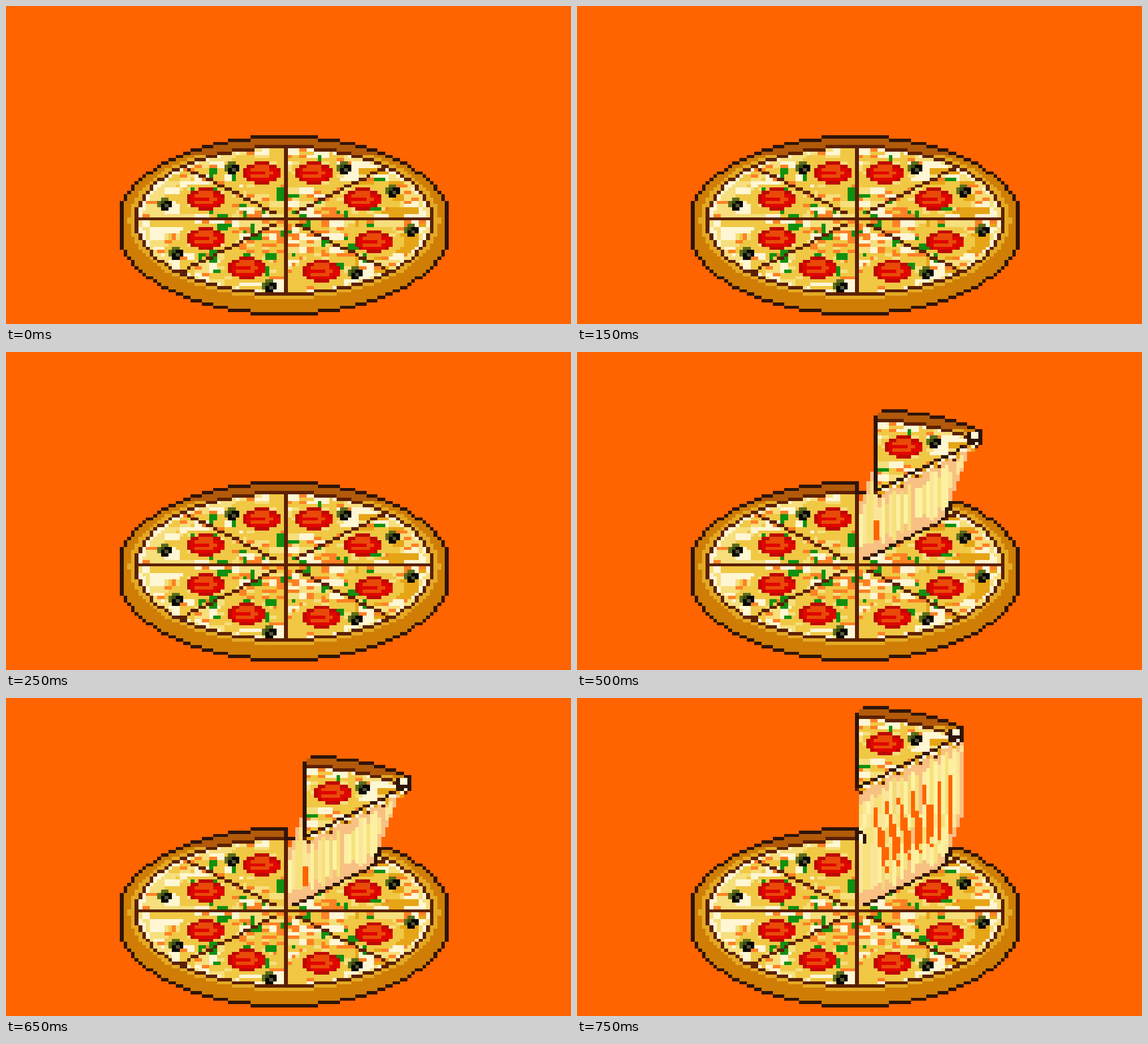
An HTML page with a canvas for the animation above (1000 ms loop, 998 by 561 pixels).

```html
<!DOCTYPE html>
<html lang="en">
<head>
<meta charset="utf-8">
<title>Pizza</title>
<style>
  html, body { margin: 0; width: 100%; height: 100%; overflow: hidden; background: #ff6400; }
  canvas { position: absolute; left: 0; top: 0; }
  .whole { animation: whole 1s step-end infinite; }
  .lift { animation: lift 1s step-end infinite; }
  .high { animation: high 1s step-end infinite; }
  @keyframes whole { 0% { opacity: 1 } 50%, 100% { opacity: 0 } }
  @keyframes lift { 0% { opacity: 0 } 50% { opacity: 1 } 75%, 100% { opacity: 0 } }
  @keyframes high { 0% { opacity: 0 } 75%, 100% { opacity: 1 } }
</style>
</head>
<body>
<canvas class="whole" width="998" height="561"></canvas>
<canvas class="lift" width="998" height="561"></canvas>
<canvas class="high" width="998" height="561"></canvas>
<script>
const COLS = 88, ROWS = 55, CELL_W = 6.6, CELL_H = 5.78, LEFT = 201, TOP = 228;
const MID_X = 44, MID_Y = 25, SLOPE = 0.58;
const DARK = '#2e1409', BROWN = '#5c2003', CREAM = '#fff6d4', YELLOW = '#f0c844',
      PALE = '#f6df7c', GOLD = '#e6a516', ORANGE = '#ff8124', GREEN = '#109010',
      CRUST = '#cf7d05', CRUST_LIGHT = '#e4aa24', CRUST_DARK = '#b25a0a', PEACH = '#f8c083',
      BACK = '#ff6400';

const pepperoni = [[33, 8], [47, 8], [18, 16], [60, 16], [18, 28], [63, 29], [29, 37], [49, 38]];
const olives = [[28, 8], [58, 8], [10, 19], [71, 15], [76, 27], [13, 34], [38, 44], [61, 40]];

const rand = (a, b) => {
  const v = Math.sin(a * 127.1 + b * 311.7) * 43758.5453;
  return v - Math.floor(v);
};
const cutRow = x => Math.round(24 - (x - 45) * 0.57);
const half = y => Math.min(44, Math.ceil(44.5 * Math.sqrt(1 - ((y - 27) / 27.5) ** 2)));
const inCrust = (x, y) => y >= 0 && y < ROWS && Math.abs(x + 0.5 - MID_X) < half(y);
const topping = (x, y) => ((x + 0.5 - MID_X) / 40) ** 2 + ((y - 25.5) / 23) ** 2;
const inTopping = (x, y) => topping(x, y) < 1;
const onEdge = (x, y, inside) =>
  !inside(x - 1, y) || !inside(x + 1, y) || !inside(x, y - 1) || !inside(x, y + 1);

function crustColor(x, y) {
  if (onEdge(x, y, inCrust)) return DARK;
  if (y < 6) return CRUST_DARK;
  return topping(x, y) < 1.08 ? CRUST_LIGHT : CRUST;
}

function cheeseColor(x, y) {
  const t = topping(x, y);
  const fleck = rand(x >> 1, y), patch = rand(x >> 2, y >> 1);
  const d = Math.min(...pepperoni.map(([a, b]) => ((x - a - 4.5) / 8) ** 2 + ((y - b - 3) / 5) ** 2));
  if (t > 0.9) return patch < 0.7 ? CREAM : PALE;
  if (d < 1) return fleck < 0.14 ? PALE : YELLOW;
  if (fleck < (t < 0.25 ? 0.24 : 0.1)) return ORANGE;
  if (x > 62 && patch < 0.4) return GOLD;
  if (patch < (d < 1.7 ? 0.6 : 0.25)) return YELLOW;
  return patch < 0.7 ? PALE : CREAM;
}

const grid = Array.from({ length: ROWS }, (_, y) => Array.from({ length: COLS }, (_, x) => {
  if (!inCrust(x, y)) return null;
  if (!inTopping(x, y)) return crustColor(x, y);
  return onEdge(x, y, inTopping) ? BROWN : cheeseColor(x, y);
}));

function box(x, y, w, h, color) {
  for (let j = y; j < y + h; j++) grid[j].fill(color, x, x + w);
}
function stamp(x, y, rows, colors) {
  rows.forEach((row, j) => [...row].forEach((c, i) => {
    if (colors[c]) grid[y + j][x + i] = colors[c];
  }));
}

// Herbs lie scattered along the eight cuts.
for (let i = 0; i < 60; i++) {
  const angle = i * Math.PI / 4 + (rand(i, 1) - 0.5) * 0.6, r = 0.1 + 0.75 * rand(i, 2);
  const size = 1 + Math.floor(rand(i, 3) * 3), upright = rand(i, 4) < 0.4;
  box(Math.round(MID_X + 40 * r * Math.cos(angle)), Math.round(MID_Y + 23 * r * Math.sin(angle)),
    upright ? 1 : size, upright ? size : 1 + (i % 3 === 0), GREEN);
}

// Cuts between the slices.
box(MID_X, 4, 1, 45, BROWN);
box(4, MID_Y, 80, 1, BROWN);
for (let k = 3; k < 34; k++) {
  const rise = Math.round(k * SLOPE);
  [[-k, MID_Y - rise], [k, cutRow(MID_X + k)], [-k, MID_Y + rise], [k, MID_Y + rise]].forEach(([dx, y]) => {
    if (inTopping(MID_X + dx, y)) grid[y][MID_X + dx] = BROWN;
  });
}

const sausage = ['...dddd...', '.ddoooodd.', 'drooooorrd', 'drrrrroorr', 'drooooorrr', '.drrrrrrd.', '...dddd...'];
const olive = ['.gg.', 'gGkk', 'gkwk', '.kk.'];
pepperoni.forEach(([x, y]) => stamp(x, y, sausage, { d: '#bd0804', r: '#e00600', o: '#e94a08' }));
olives.forEach(([x, y]) => stamp(x, y, olive, { g: '#5c6d1c', G: '#3b4b12', k: '#080805', w: '#55553a' }));

function cell(g, x, y, color, w = 1, h = 1) {
  const l = Math.round(LEFT + x * CELL_W), t = Math.round(TOP + y * CELL_H);
  g.fillStyle = color;
  g.fillRect(l, t, Math.round(LEFT + (x + w) * CELL_W) - l, Math.round(TOP + (y + h) * CELL_H) - t);
}
function paint(g, keep, dx = 0, dy = 0) {
  grid.forEach((row, y) => row.forEach((c, x) => {
    if (c && keep(x, y)) cell(g, x + dx, y + dy, c);
  }));
}

const inHole = (x, y) => x > 44 && (x < 69 && y < cutRow(x) || x < 73 && y < 6);
const inSlice = (x, y) => x > 43 && x < 73 && y <= cutRow(x) && x + y > 45;

function drawRest(g) {
  paint(g, (x, y) => !inHole(x, y));
  cell(g, 44, 0, DARK, 1, 4);
}

function drawCutEdge(g) {
  for (let x = 46; x < 69; x++) cell(g, x, cutRow(x), x % 4 ? DARK : BROWN);
  cell(g, 69, 6, DARK, 4);
  cell(g, 69, 6, DARK, 1, 3);
  cell(g, 68, 8, DARK, 1, 3);
}

function drawSlice(g, dx, dy) {
  const put = (x, y, c, w, h) => cell(g, x + dx, y + dy, c, w, h);
  paint(g, inSlice, dx, dy);
  put(44, 2, DARK, 1, 23);
  for (let x = 45; x < 72; x++) {
    const y = cutRow(x);
    put(x, y, x % 4 ? DARK : BROWN);
    put(x, y + 1, x % 3 ? CREAM : GOLD);
    if (x % 5 < 2) put(x, y + 2, x % 2 ? BROWN : GOLD);
  }
  put(69, 7, DARK, 1, 3);
  put(70, 7, CREAM, 2, 2);
  put(70, 9, DARK, 3);
  put(72, 7, DARK, 1, 4);
}

const strands = ['#fdf3a4', '#f7e17c', '#fbe596', '#f4d878', '#fcf0a0'];
const cheeseEnd = x => x < 69 ? cutRow(x) : 6 - (x - 69) * 3;

function drawCheese(g, to, top, lean) {
  for (let x = 45; x <= to; x++) {
    const a = top(x), b = cheeseEnd(x);
    const fray = 1 + Math.floor(rand(x, 5) * 4);
    for (let y = a; y < b; y++) {
      const s = Math.floor(x + Math.sin(y / 9) * lean);
      const edge = y - a < fray || b - y <= fray || rand(s, 3) < 0.12;
      cell(g, x, y, edge ? PEACH : strands[Math.floor(rand(s, 9) * strands.length)]);
    }
  }
}

// Slanted openings that straighten towards the right.
function drawOpenings(g) {
  for (let i = 0; i < 7; i++) {
    const x = 48.5 + i * 3.4, lean = 3.5 - i * 0.5;
    const from = Math.round(-6 - i * 1.7), to = Math.round(14 - i * 2);
    for (let y = from; y < to; y++) {
      const t = (y - from) / (to - from);
      cell(g, Math.round(x + lean * t), y, BACK, i < 5 && t > 0.3 && t < 0.8 ? 2 : 1);
    }
  }
}

const [whole, lift, high] = [...document.querySelectorAll('canvas')].map(c => {
  const g = c.getContext('2d');
  g.fillStyle = BACK;
  g.fillRect(0, 0, 998, 561);
  return g;
});

paint(whole, () => true);

drawRest(lift);
drawCheese(lift, 75, x => x < 50 ? 6 - (x - 45) * 3 : cutRow(x - 5) - 20, 0);
cell(lift, 49, 12, BACK, 1.4, 6);
cell(lift, 45, 3, DARK, 2);
drawCutEdge(lift);
drawSlice(lift, 5, -22);

drawRest(high);
drawCheese(high, 72, x => cutRow(x) - 35, 2);
drawOpenings(high);
cell(high, 45, 1, DARK);
cell(high, 45, 2, CREAM, 1, 2);
cell(high, 46, 2, DARK, 1, 3);
drawCutEdge(high);
drawSlice(high, 0, -37);
</script>
</body>
</html>
```
